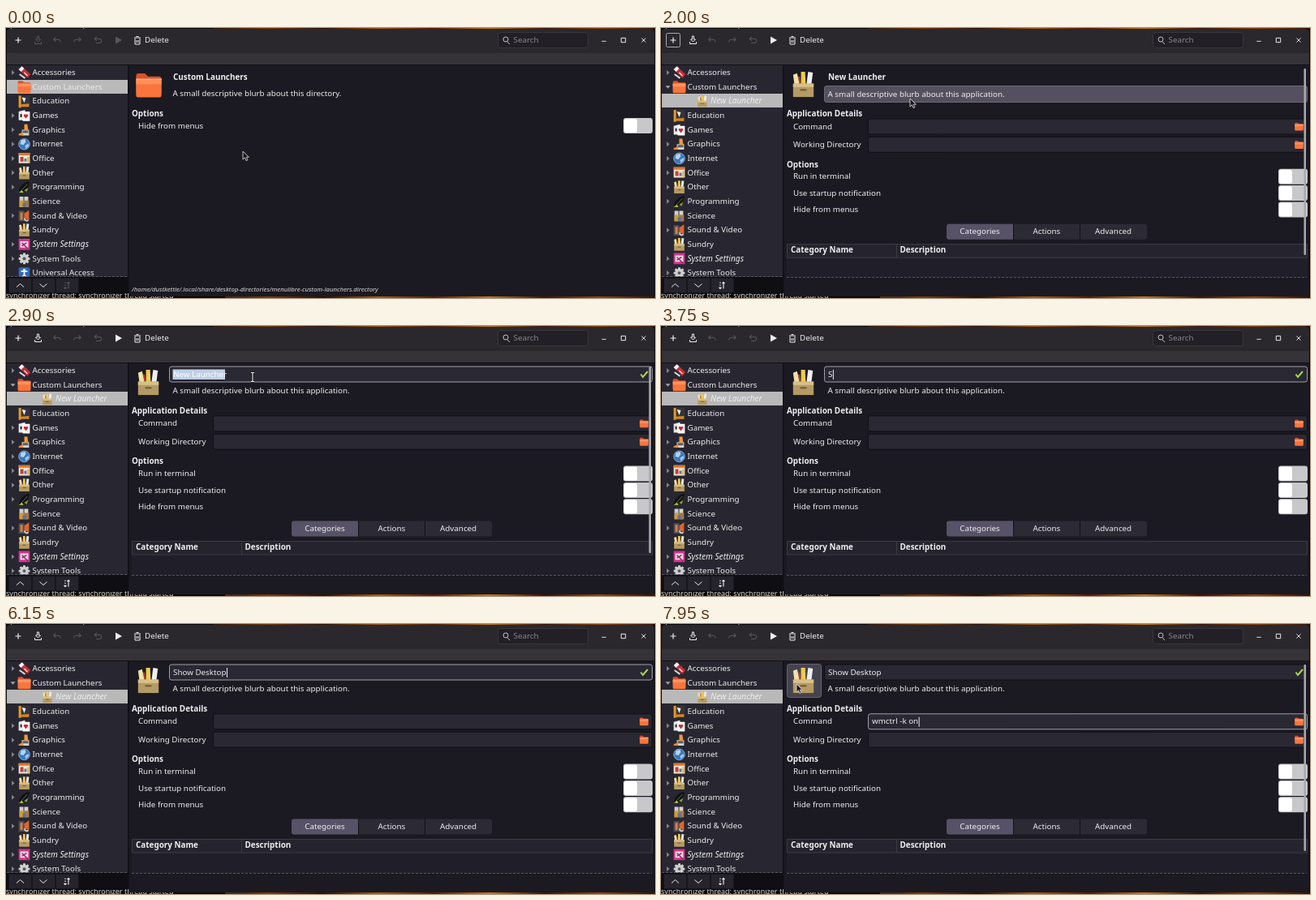
These frames come from a looping animation (800x333 px, 8 s). An HTML page with a canvas:

```html
<!DOCTYPE html>
<html lang="en">
<head>
<meta charset="utf-8">
<title>Menu editor</title>
<style>
  html, body { margin: 0; width: 100%; height: 100%; overflow: hidden; background: #1b1a22; }
  canvas { display: block; width: 800px; height: 333px; }
</style>
</head>
<body>
<canvas id="stage" width="800" height="333"></canvas>
<script>
const ctx = document.getElementById('stage').getContext('2d');
const LOOP = 8000;
const WHITE = '#eeeeee', DIM = '#59575e', FIELD = '#292833', EDGE = '#100f15';
const PLAIN = '9.8px "Noto Sans", sans-serif';
const BOLD = 'bold 9.9px "Noto Sans", sans-serif';
const ITALIC = 'italic 10.1px "Noto Sans", sans-serif';

// Times of the interface events, in ms
const MENU_OPEN = 950, CREATED = 1600, EDIT_NAME = 2400, TYPE_NAME = 3700, EDIT_COMMAND = 6400, MOUSE_BACK = 7550;

const mousePath = [
  [0, 292, 152], [250, 292, 152], [850, 16, 16], [1050, 16, 16], [1250, 25, 30], [1450, 37, 38],
  [1650, 37, 38], [2000, 307, 87], [2250, 304, 63], [MOUSE_BACK, 304, 63], [7900, 167, 74], [LOOP, 167, 74]
];

// Icons are drawn around 0,0 in a 16 unit square: [path, colour, line width if stroked]
const icons = {
  knife: [['M-7-4l4-4 11 10-4 5z', '#c92f35'], ['M-7-4l4-4 3 3-4 4z', '#f1f1f1'], ['M-6 2l7 5', '#d9d9d9', 2], ['M0 0l4 4', '#fff', 1.3]],
  folder: [['M-8-6q0-1.5 1.5-1.5h4l2 2h7q1.5 0 1.5 1.5v9h-16z', '#dd4f2b'], ['M-8-4h16v10.5q0 1.2-1.2 1.2h-13.6q-1.2 0-1.2-1.2z', '#f8753d'],
    ['M-8-4h16v3.5h-16z', '#ff8f58'], ['M-8-4h16v.6h-16z', '#ffb487']],
  school: [['M-6-7h13v14h-13z', '#33343d'], ['M-7-7h3v15h-3z', '#e59b2c'], ['M-3-5l5 1-2 6z', '#f6f1dc'], ['M-5 4l11-1v4h-11z', '#d68524']],
  cards: [['M-7-5l8-2v13h-8z', '#e8e8e8'], ['M-2-5h9v12h-9z', '#fff'], ['M2 4l-3-4q1-3 3-1 2-2 3 1z', '#d7202c'], ['M-5-2h2v4h-2z', '#222']],
  brush: [['M-3 0h9v7h-9z', '#d5d5d5'], ['M-7 5l5-2 1 4h-6z', '#e8912d'], ['M0-7h4l1 8h-5z', '#ee9b38'], ['M-2 1h7v3h-7z', '#595d65']],
  globe: [['M-7 0a7 7 0 1 1 14 0a7 7 0 1 1-14 0', '#3978c0'], ['M-4-5l5-1 1 3-3 4-4-1z', '#b3d4ef'], ['M1 2l4-3 1 3-4 4z', '#a2c9ea'], ['M-7 0a7 7 0 1 1 14 0a7 7 0 1 1-14 0', '#a8c8e6', 0.7]],
  office: [['M-7-7h14v13h-14z', '#f1e6d2'], ['M-7-7h14v3h-14z', '#e0752d'], ['M-5-2h4v6h-4z', '#c83b36'], ['M0 0h3v4h-3z', '#4c79b4'], ['M4-2h2v7h-2z', '#e6a631']],
  basket: [['M-5.5 1l-1-7 2.5-1 2 8z', '#f0e3a8'], ['M-1.5 0l0-8 2.6 0 .4 8z', '#efcb4b'], ['M2 0l1-8 3 .5-1 8z', '#eeeeee'], ['M-2.2 0l-.6-5', '#b8433a', 1],
    ['M-6.5-.5h13v8.5h-13z', '#b59a63'], ['M-6.5-.5h13v2.2h-13z', '#d8c08a'], ['M-2 3.5h4', '#6d5733', 1]],
  pen: [['M-7 7q1-9 9-13l5-1-2 6q-5 7-12 8z', '#101114'], ['M-7 7l4-3 2 3z', '#c7d42f'], ['M-6 7l10-11', '#66743b', 1], ['M0 4l5-3-2 5z', '#86a62c']],
  science: [['M-6-6h5v13h-5z', '#c9ced4'], ['M-6-1h5v8h-5z', '#d99a2b'], ['M0-6h5v13h-5z', '#d8d2c6'], ['M0-1h6v8h-6z', '#a4774a'], ['M-2 2h4v5h-4z', '#56749a']],
  video: [['M-7-6h7v13h-7z', '#4f5258'], ['M-5-4h3v9h-3z', '#e27d39'], ['M0-3l6-4v12l-6-2z', '#df652d'], ['M1 3a2 2 0 1 0 4 2', '#c9c9c9', 2]],
  settings: [['M-7-7h14v14h-14z', '#d7338f'], ['M-5-4h10v8h-10z', '#f8dceb'], ['M-3-2l8 8M3-2l-6 4', '#8e3566', 1.6]],
  gear: [['M0-7v14M-7 0h14M-5-5l10 10M5-5l-10 10', '#cfcfcf', 3], ['M-4 0a4 4 0 1 0 8 0a4 4 0 1 0-8 0', '#cfcfcf', 3], ['M-2 0a2 2 0 1 0 4 0a2 2 0 1 0-4 0', '#55565c']],
  access: [['M-7-5q0-2 2-2h10q2 0 2 2v10q0 2-2 2h-10q-2 0-2-2z', '#2f68bd'], ['M-4-2h8M0-2v4M0 2l-3 4M0 2l3 4', '#fff', 1.6], ['M-1.5-5h3v2h-3z', '#fff']]
};

// Sidebar rows: [label, icon, expandable]
const rows = [
  ['Accessories', 'knife', true], ['Custom Launchers', 'folder'], ['Education', 'school'], ['Games', 'cards', true],
  ['Graphics', 'brush', true], ['Internet', 'globe', true], ['Office', 'office', true], ['Other', 'basket', true],
  ['Programming', 'pen', true], ['Science', 'science'], ['Sound & Video', 'video', true], ['Sundry', 'basket'],
  ['System Settings', 'settings', true], ['System Tools', 'gear', true], ['Universal Access', 'access']
];

function text(label, x, y, color = WHITE, font = PLAIN) {
  ctx.font = font;
  ctx.fillStyle = color;
  ctx.fillText(label, x, y + 3.1);
}

function box(x, y, w, h, fill, stroke, radius = 0) {
  ctx.beginPath();
  ctx.roundRect(x, y, w, h, radius);
  if (fill) { ctx.fillStyle = fill; ctx.fill(); }
  if (stroke) { ctx.strokeStyle = stroke; ctx.lineWidth = 1; ctx.stroke(); }
}

function shape(d, x, y, color, lineWidth, scale = 1) {
  ctx.save();
  ctx.translate(x, y);
  ctx.scale(scale, scale);
  const path = new Path2D(d);
  if (lineWidth) {
    ctx.strokeStyle = color;
    ctx.lineWidth = lineWidth;
    ctx.stroke(path);
  } else {
    ctx.fillStyle = color;
    ctx.fill(path);
  }
  ctx.restore();
}

function dashedLine(x, y, w) {
  ctx.setLineDash([3, 2]);
  shape(`M0 0h${w}`, x, y, '#56545f', 1);
  ctx.setLineDash([]);
}

function icon(name, x, y, scale = 1) {
  for (const [d, color, lineWidth] of icons[name]) shape(d, x, y, color, lineWidth, scale);
}

function typed(keys, start, step, t) {
  let out = '';
  for (const key of keys.slice(0, Math.max(0, Math.floor((t - start) / step) + 1))) {
    out = key === '<' ? out.slice(0, -1) : out + key;
  }
  return out;
}

function mouseAt(t) {
  const i = Math.max(1, mousePath.findIndex(p => p[0] > t));
  const [t0, x0, y0] = mousePath[i - 1], [t1, x1, y1] = mousePath[i];
  const u = (t - t0) / (t1 - t0), e = u * u * (3 - 2 * u);
  return { x: x0 + (x1 - x0) * e, y: y0 + (y1 - y0) * e };
}

function drawDesktop() {
  box(0, 0, 800, 333, '#09080b');
  const glow = ctx.createLinearGradient(255, 0, 800, 0);
  ['#2b1208', '#7b3a0d', '#2a0d07', '#a75a12', '#571b0a', '#c0771b', '#3b1208', '#8f4510', '#341008']
    .forEach((c, i) => glow.addColorStop(i / 8, c));
  box(255, 0, 545, 1, glow);
  box(298, 331, 502, 2, glow);
  box(270, 328, 28, 5, '#4e2a1b');
  const log = 'synchronizer thread: synchronizer thread started';
  text(log, 0, -3, '#d5d5d5', '9px "Noto Sans", sans-serif');
  text(log, 0, 330, '#d5d5d5', '9px "Noto Sans", sans-serif');
}

function drawHeader(t) {
  const ready = t >= CREATED ? WHITE : DIM;
  box(1, 1, 798, 30, '#2a282d', null, [4, 4, 0, 0]);
  box(1, 30, 798, 16, '#363338');
  box(1, 29.5, 798, 1, '#242227');
  box(1, 45, 798, 1, '#111015');
  if (t >= MENU_OPEN && t < CREATED) box(6.5, 6.5, 17, 17, '#4c4a52', '#6b6970', 2);
  else if (t >= CREATED && t < EDIT_NAME) box(6.5, 6.5, 17, 17, null, '#aaa8af', 2);
  shape('M-3.5 0h7M0-3.5v7', 15, 15, WHITE, 1.2);
  shape('M-1-5v4h-2l3 3 3-3h-2v-4zM-4 2v2.5h8v-2.5', 39.5, 15, ready, 1);
  shape('M-2-4l-3 3 3 3M-5-1h6q4 0 4 4', 63, 15, DIM, 1.2, 0.85);
  shape('M2-4l3 3-3 3M5-1h-6q-4 0-4 4', 88, 15, DIM, 1.2, 0.85);
  shape('M-2-5l-3 3 3 3M-5-2h6q4 0 4 3t-4 3h-4', 113.5, 15, DIM, 1.2, 0.85);
  shape('M-3-4.5l8 4.5-8 4.5z', 138, 15, ready);
  shape('M-4-3h8M-1.5-4.5h3M-3-2v7h6v-7M-1 0v3M1 0v3', 162, 15, WHITE, 1);
  text('Delete', 171, 15);
  box(606.5, 5.5, 111, 19, '#222026', '#39373d', 3);
  shape('M-3-1a3 3 0 1 1 6 0a3 3 0 1 1-6 0M2 2l3 3', 616, 15, '#c4c3c8', 1);
  text('Search', 625.5, 15, '#88868d');
  shape('M-3 1.5h6', 737, 15, WHITE, 1, 0.9);
  shape('M-3-3h6v6h-6z', 761, 15, WHITE, 1.1, 0.9);
  shape('M-3-3l6 6M3-3l-6 6', 786, 15, WHITE, 1.1, 0.85);
}

function drawSidebar(t) {
  const created = t >= CREATED;
  const list = created ? [...rows.slice(0, 2), ['New Launcher', 'basket'], ...rows.slice(2)] : rows;
  box(1, 46, 149, 281, '#282731');
  ctx.save();
  ctx.beginPath();
  ctx.rect(1, 46, 149, 260.5);
  ctx.clip();
  list.slice(0, 15).forEach(([label, kind, expandable], i) => {
    const y = 55 + i * 17.65;
    const child = label === 'New Launcher', indent = child ? 28.5 : 0;
    if (i === (created ? 2 : 1)) box(1, Math.round(y - 9), 149, 17, '#b9b9b9');
    if (created && i === 1) shape('M-3-1.5h6l-3 3.5z', 8.5, y, '#a3a2a8');
    else if (expandable) shape('M-1.5-3l3.5 3-3.5 3z', 8.5, y, '#85848c');
    icon(kind, 22.5 + indent, y, child ? 0.86 : 0.98);
    text(label, 32.5 + indent, y, WHITE, child || kind === 'settings' ? ITALIC : PLAIN);
  });
  ctx.restore();
  if (t > 650 && t < CREATED) box(145, 47, 2.5, 198, '#a7a6ab', null, 1);

  box(1, 307, 149, 20, '#0f0e13');
  dashedLine(1, 306.5, 149);
  for (const x of [3, 32, 61]) box(x + 0.5, 308.5, 28, 18, '#25242d', '#17161c');
  shape('M-4.5 2l4.5-4 4.5 4', 17.5, 317.5, WHITE, 1);
  shape('M-4.5-2l4.5 4 4.5-4', 46, 317.5, WHITE, 1);
  shape('M-2-4v1.5M-2-1v1.5M-2 2v2M-3.5 2.5l1.5 1.5 1.5-1.5M2 4v-8M.5-2.5l1.5-1.5 1.5 1.5', 75, 317.5, created ? WHITE : DIM, 1.1);
  box(150, 46, 1.5, 281, EDGE);
}

function drawToggle(y) {
  box(761, y - 9.5, 36, 19, '#c8c8ca', null, 3);
  box(762, y - 8.5, 16, 17, '#ffffff', null, 2.5);
}

function drawEntry(x, y, value, focused) {
  box(x + 0.5, y - 9.5, 796 - x, 19, FIELD, focused ? '#a09ea7' : EDGE, 2.5);
  text(value, x + 5, y);
  if (focused) box(x + 5.5 + ctx.measureText(value).width, y - 5.5, 1, 12, WHITE);
}

function drawDirectory() {
  icon('folder', 176, 70.5, 1.95);
  text('Custom Launchers', 206, 61, WHITE, BOLD);
  text('A small descriptive blurb about this directory.', 205.5, 81.3);
  text('Options', 155, 106, WHITE, BOLD);
  text('Hide from menus', 163, 121);
  drawToggle(120.5);
  text('/home/dustkettle/.local/share/desktop-directories/menulibre-custom-launchers.directory',
    155, 321.8, '#dddddd', 'italic 7.77px "Noto Sans", sans-serif');
}

function drawName(t, mouse) {
  const hover = t < EDIT_NAME && mouse.x > 201;
  if (t < EDIT_NAME) {
    if (hover && mouse.y >= 50 && mouse.y < 71) box(201.5, 50.5, 595, 20, '#55505f', '#6d6877', 2.5);
    if (hover && mouse.y >= 71 && mouse.y < 93) box(201.5, 71.5, 595, 20, '#55505f', '#6d6877', 2.5);
    text('New Launcher', 206, 61, WHITE, BOLD);
    text('A small descriptive blurb about this application.', 205.5, 81.5);
    return;
  }
  const selected = t < TYPE_NAME;
  drawEntry(201, 59.5, selected ? '' : typed('Show Se<<Desktop', TYPE_NAME, 150, t), t < EDIT_COMMAND);
  if (selected) {
    box(205.5, 53.5, 64.5, 12.5, '#bfd0e4');
    text('New Launcher', 206, 59.5, '#ffffff');
  }
  shape('M-4 0l2.5 3.5 6-7', 786.5, 59.5, '#a9d84f', 2);
  text('A small descriptive blurb about this application.', 205.5, 80);
}

function drawLauncher(t, mouse) {
  const shift = t < EDIT_NAME ? 1.2 : 0;
  if (t > MOUSE_BACK && mouse.x < 197) box(155.5, 49.5, 42, 41, '#464350', '#67646f', 3);
  icon('basket', 175.5, 69.5, 1.95);
  drawName(t, mouse);

  ctx.save();
  ctx.translate(0, shift);
  text('Application Details', 155, 104.7, WHITE, BOLD);
  const command = typed('wmctrl', 6500, 100, t) + typed(' -k on', 7250, 60, t);
  [['Command', 120.3, command, t >= EDIT_COMMAND], ['Working Directory', 142.7, '', false]].forEach(([label, y, value, focused]) => {
    text(label, 163, y);
    drawEntry(255, y, value, focused);
    icon('folder', 786.5, y, 0.65);
  });
  text('Options', 155, 167.3, WHITE, BOLD);
  ['Run in terminal', 'Use startup notification', 'Hide from menus'].forEach((label, i) => {
    const y = 182 + i * 20.4;
    text(label, 163, y);
    drawToggle(y);
  });
  box(352, 240.5, 247, 19, '#2c2b35', null, 3);
  box(352, 240.5, 82, 19, '#575267', null, [3, 0, 0, 3]);
  box(434, 240.5, 1, 19, EDGE);
  box(516, 240.5, 1, 19, EDGE);
  ctx.textAlign = 'center';
  ['Categories', 'Actions', 'Advanced'].forEach((label, i) => text(label, 393 + i * 82.3, 250));
  ctx.textAlign = 'left';
  ctx.restore();

  const top = 265 + shift;
  box(155, top, 642, 308 - top, '#201f29');
  box(155.5, top + 0.5, 641, 16.5, '#25242e', '#3c3a45');
  box(290, top, 1, 17, '#3c3a45');
  text('Category Name', 160, 273 + shift, WHITE, BOLD);
  text('Description', 294.5, 273 + shift, WHITE, BOLD);
  dashedLine(155, 307.5, 641);
  if (t < 3600 || t > MOUSE_BACK) box(792.5, 50, 2.5, 230, '#aaa9ae', null, 1);
}

function drawMenu(mouse) {
  box(5, 28, 110, 55.5, '#2b2a31', '#19181d', 2);
  ['Add Launcher', 'Add Directory', 'Add Separator'].forEach((label, i) => {
    if (i === 0 && mouse.y > 28) box(5.5, 29, 109, 18, '#47454d');
    text(label, 26, 38 + i * 18.4);
  });
}

function drawPointer(t, { x, y }) {
  if (t >= TYPE_NAME - 50 && t < MOUSE_BACK) return;
  const overText = t >= EDIT_NAME && x > 201;
  if (overText) {
    const beam = 'M-2-5.5h1.5l.5 1 .5-1h1.5M0-5v10M-2 5.5h1.5l.5-1 .5 1h1.5';
    shape(beam, x, y, '#111', 2.6);
    shape(beam, x, y, '#eee', 1.1);
  } else {
    const arrow = 'M0 0v11l2.6-2.4 1.8 4 2-.9-1.8-3.9h3.4z';
    shape(arrow, x, y, '#17161a', 0, 0.92);
    shape(arrow, x, y, '#d2d2d2', 1, 0.92);
  }
}

function draw(now) {
  const t = now % LOOP, mouse = mouseAt(t);
  drawDesktop();
  box(1, 46, 798, 281, '#1b1a22');
  box(151, 46, 648, 285, '#1b1a22');
  drawHeader(t);
  drawSidebar(t);
  if (t < CREATED) drawDirectory();
  else drawLauncher(t, mouse);
  if (t >= MENU_OPEN && t < CREATED) drawMenu(mouse);
  drawPointer(t, mouse);
}

const start = performance.now();
function tick() {
  draw(performance.now() - start);
  requestAnimationFrame(tick);
}
tick();
</script>
</body>
</html>
```
